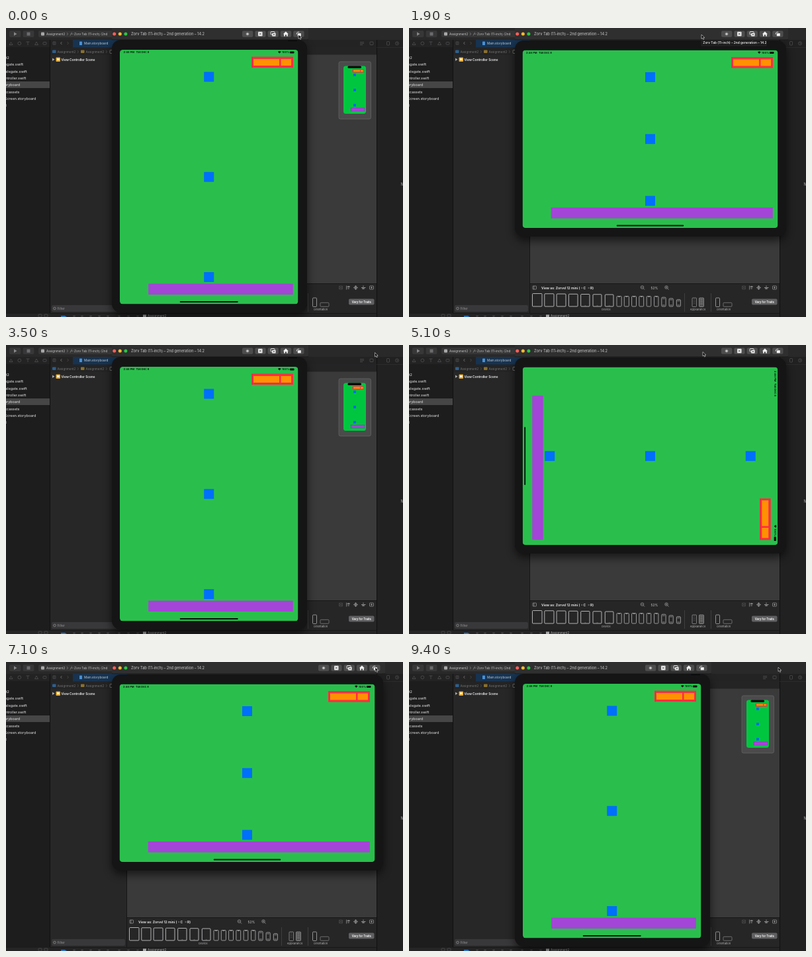
Recreate the animation shown at these times as an HTML page. Size 600 by 438 pixels, loop 9600 ms.

```html
<!DOCTYPE html>
<html lang="en">
<head>
<meta charset="utf-8">
<title>Device rotation</title>
<style>
html, body { margin: 0; width: 100%; height: 100%; overflow: hidden; background: #1d1d1e; }
svg { display: block; width: 100vw; height: 100vh; font-family: Inter, "Open Sans", sans-serif; }
text { white-space: pre; }
</style>
</head>
<body>
<svg id="stage" viewBox="0 0 600 438">
  <filter id="soft" x="-20%" y="-20%" width="140%" height="140%"><feGaussianBlur stdDeviation="7"/></filter>
  <g id="editor"></g>
  <g id="sim"></g>
  <g id="pointer"></g>
</svg>
<script>
const LOOP = 9600, STEP = 100;
const DEVICE = 'Zorv Tab (11-inch) – 2nd generation – 14.2';
const PREVIEW = 'Zorvel 12 mini';
const C = {
  green: '#2abf4c', blue: '#006ffb', purple: '#a345d6', red: '#fb2d42', orange: '#ff9102',
  icon: '#8b8b8c', dim: '#555556', text: '#e6e6e7'
};
const $ = id => document.getElementById(id);

const rect = (x, y, w, h, fill, extra = '') =>
  `<rect x="${x}" y="${y}" width="${w}" height="${h}" fill="${fill}" ${extra}/>`;
const frame = (x, y, w, h, stroke, r = 0.8, sw = 0.7) =>
  rect(x, y, w, h, 'none', `rx="${r}" stroke="${stroke}" stroke-width="${sw}"`);
const line = (d, stroke = C.icon, sw = 0.7) =>
  `<path d="${d}" fill="none" stroke="${stroke}" stroke-width="${sw}"/>`;
const fill = (d, color) => `<path d="${d}" fill="${color}"/>`;
const dot = (x, y, r, color) => `<circle cx="${x}" cy="${y}" r="${r}" fill="${color}"/>`;
const ring = (x, y, r, color) =>
  `<circle cx="${x}" cy="${y}" r="${r}" fill="none" stroke="${color}" stroke-width=".7"/>`;
const text = (x, y, size, str, color = C.text, extra = '') =>
  `<text x="${x}" y="${y}" font-size="${size}" fill="${color}" ${extra}>${str}</text>`;
const BOLD = 'font-weight="600"', MID = 'text-anchor="middle"';

function toolbar() {
  let s = rect(0, 0, 600, 18, '#29292a') + rect(0, 18, 600, 11.5, '#232324');
  s += rect(5, 4, 17.5, 10, '#373738', 'rx="2"') + rect(25.5, 4, 17, 10, '#373738', 'rx="2"');
  s += fill('M12 6.3V11.7L16.5 9Z', '#88888a') + rect(31.5, 6.5, 5, 5, '#6c6c6e');
  s += rect(49, 4, 130, 10, '#363637', 'rx="2"');
  s += rect(53, 6.5, 5, 5, '#a9a9aa', 'rx="1"');
  s += text(61, 11, 4.6, 'Assignment2', '#c6c6c8') + line('M92 7l1.5 2-1.5 2');
  s += line('M97 11.500l2.500-5M98 9h4', C.icon);
  s += text(103, 11, 4.6, 'Zorv Tab (11-inch) (2nd', '#c6c6c8');
  return s;
}

function navigator() {
  let s = rect(0, 29.5, 66, 408.5, '#1d1d1e') + rect(0, 81, 66, 10, '#464647');
  s += line('M5 25.500l2.500-4 2.500 4z', C.dim) + ring(20.3, 23.3, 2.4, C.dim);
  s += line('M30.5 21h5M33 21v5', C.dim);
  s += line('M43.5 25.5L46 21l2.500 4.500Z', C.dim) + frame(56, 21.5, 5, 3.5, C.dim);
  s += text(-28.6, 46.9, 5.4, 'Assignment2');
  ['AppDelegate.swift', 'SceneDelegate.swift', 'ViewController.swift', 'Main.storyboard',
    'Assets.xcassets', 'LaunchScreen.storyboard', 'Info.plist'
  ].forEach((name, i) => s += text(-20.7, 57.3 + i * 10.3, 5.4, name));
  return s;
}

function outline() {
  let s = rect(66, 29.5, 117, 408.5, '#272728') + rect(101, 18, 82, 11.5, '#173350');
  s += line('M66.500 18V438', '#111112', 1) + line('M182.500 29V432', '#161616', 1);
  s += line('M71 21h4v4h-4zM73 21v4', C.dim) + line('M84.500 21l-2 2 2 2') + line('M92.500 21l2 2-2 2', C.dim);
  s += rect(111, 20.5, 4, 5.5, '#4b8fd0', 'rx=".6"') + text(118, 25, 4.7, 'Main.storyboard', '#c3ccd6');
  s += rect(67, 30, 116, 11, '#242425');
  [70, 113].forEach(x => {
    s += rect(x, 33.5, 5.5, 4.5, x < 80 ? '#2f5f8c' : '#8a7130', 'rx=".7"');
    s += text(x + 7.5, 37.6, 4.5, 'Assignment2', '#737374') + line(`M${x + 38} 34l1.500 2-1.500 2`, C.dim);
  });
  s += frame(157, 33.5, 4, 5, C.icon);
  s += fill('M70 45.500V50L73.500 47.750Z', '#a6a6a7');
  s += rect(75.5, 44.5, 6.5, 6.5, '#e5aa2f', 'rx="1"') + rect(77, 46.2, 3.5, 2.5, '#fff');
  s += text(83.5, 49.5, 4.75, 'View Controller Scene', '#f2f2f2', BOLD);
  s += rect(69, 420, 111, 10, '#38383a', 'rx="2"') + ring(73.5, 425, 1.8, '#999');
  return s + text(77.5, 426.8, 4.8, 'Filter', '#98989a');
}

function phonePreview() {
  let s = rect(503, 51, 48.5, 87, '#4b4b4c', 'rx="2.500" stroke="#686869" stroke-width=".7"');
  s += rect(510, 57.5, 34, 72.5, '#00c63f', 'rx="3.500"');
  s += rect(516.5, 57.5, 20.5, 3.5, '#080808', 'rx="1.500"');
  s += rect(523.5, 62.5, 17.5, 5, C.red) + rect(525, 63.7, 10, 2.5, C.orange) + rect(536, 63.7, 4, 2.5, C.orange);
  [71, 94, 117].forEach(y => s += rect(525, y - 2, 4, 4, '#0a6af0'));
  s += rect(521, 121, 21, 5, C.purple, 'stroke="#542477" stroke-width=".4" stroke-dasharray="1 1"');
  return s;
}

function deviceBar() {
  const gray = '#a0a0a1';
  let s = rect(183, 387, 377, 45, '#262627') + line('M183 387.500H560', '#171718', 1);
  s += frame(187, 391, 5.5, 5, gray) + line('M188.800 391v5', gray);
  s += text(200, 395.5, 5, `View as: ${PREVIEW} (`, '#f0f0f0', BOLD);
  s += line('M260 394h2.500M270.500 394h2.500', gray, 0.8);
  s += text(263.5, 395.5, 5, 'C', '#f0f0f0', BOLD) + text(274, 395.5, 5, 'R)', '#f0f0f0', BOLD);
  [352.5, 389].forEach((x, i) => {
    s += ring(x, 393, 2.3, gray);
    s += line(`M${x + 1.6} 394.600l2 2M${x - 1.2} 393h2.400` + (i ? `M${x} 391.800v2.400` : ''), gray);
  });
  s += text(371, 395.5, 5, '52%', '#d0d0d0', MID);
  s += line('M503.500 391.500l5 4M508.500 391.500l-5 4', '#555') + frame(503.5, 391, 5, 5, '#505052');
  s += line('M514.500 390.500v6M516 392h4M516 395h3', gray) + frame(516, 391.5, 3, 1.5, gray);
  s += line('M528.500 390v7M525 393.500h7M527 391.500h3v4h-3z', gray);
  s += line('M537 393.500h6.500M540 390.500v2M540 396v-1.500M538 395h4', gray, 0.9);
  s += frame(549.5, 391, 6, 5, gray) + line('M552.500 392v3M551 393.500h3', gray);
  for (let i = 0; i < 7; i++) {
    const w = 14.5 - i * 0.3, h = 19.5 - i * 0.25, x = 186.5 + i * 18.3;
    s += frame(x, 422 - h, w, h, '#c2c2c3', 1, 0.9);
    if (i > 3) s += line(`M${x + w / 2 - 1} 420.800h2`, '#b5b5b6', 0.4);
  }
  for (let i = 0; i < 9; i++) {
    const h = 15.5 - Math.max(0, i - 5) * 1.7, x = 314 + i * 11.3;
    s += frame(x, 422 - h, 7.2 - i * 0.15, h, '#b5b5b6', 1.3, 0.8);
    s += line(i < 6 ? `M${x + 2} ${423 - h}h3` : `M${x + 1} ${424 - h}h4M${x + 1} 420h4`, '#aaaaab');
  }
  s += text(298, 428.3, 4.1, 'Device', '#b7b7b8', MID);
  s += line('M416.500 402V430M456.500 402V430', '#4a4a4b');
  s += frame(428, 409, 6.5, 13.5, gray, 1) + line('M430 411h2.500M429.500 414h3.500M429.500 417h3.500', C.dim);
  s += rect(438.5, 409, 7, 13.5, '#555', `rx="1" stroke="${gray}" stroke-width=".7"`) + line('M440 412h4M440 415h4M440 418h4');
  s += text(436.5, 428.3, 4.1, 'Appearance', '#b7b7b8', MID);
  s += frame(463.5, 409, 6, 13.5, '#c0c0c1', 1.2) + frame(475, 416.3, 13, 6, C.icon, 1.2);
  s += text(475.5, 428.3, 4.1, 'Orientation', '#b7b7b8', MID);
  s += rect(518, 410.5, 38.5, 9, '#606062', 'rx="1.800"');
  s += text(537.3, 416.6, 4.25, 'Vary for Traits', '#fff', `${BOLD} ${MID}`);
  return s;
}

function rightSide() {
  let s = rect(560, 18, 40, 420, '#212122') + line('M560.500 18V438', '#111', 1);
  s += line('M560 29.500H600', '#343435', 0.5);
  s += line('M535 21.500h6M535 23.500h6M535 25.500h4', C.dim) + frame(550, 21, 5, 4.5, C.dim);
  s += frame(575.5, 20.5, 4, 5.5, C.dim);
  s += ring(591, 23.3, 2.5, C.dim) + line('M591 21.800v1.700h1.200', C.dim);
  return s + text(596.5, 239, 5.5, 'N', '#a5a5a6');
}

function footer() {
  let s = rect(66, 432, 494, 6, '#242425') + line('M66 432.500H560', '#141415');
  s += fill('M83 436h6l3 2h-9z', '#2b6cb8');
  [101, 113, 126, 139, 152, 169, 183, 197].forEach(x => s += line(`M${x} 436.500h4M${x + 2} 435.500v2.500`, C.dim));
  s += rect(207, 434.5, 5, 3.5, '#a9a9aa') + text(214, 438.2, 4.6, 'Assignment2', '#a9a9aa');
  return s + rect(0, 433, 66, 5, '#252526') + frame(49, 434, 5, 4, C.dim) + frame(58, 434, 5, 4, C.dim);
}

$('editor').innerHTML = rect(0, 0, 600, 438, '#1d1d1e') + rect(183, 29.5, 377, 358, '#3a3a3b') +
  rect(183, 29.5, 377, 11, '#242425') + toolbar() + navigator() + outline() + phonePreview() +
  deviceBar() + rightSide() + footer();

// Cubic-bezier(.42, 0, .58, 1)
function ease(u) {
  if (u <= 0) return 0;
  if (u >= 1) return 1;
  let lo = 0, hi = 1, s;
  for (let i = 0; i < 24; i++) {
    s = (lo + hi) / 2;
    const x = 3 * (1 - s) ** 2 * s * 0.42 + 3 * (1 - s) * s * s * 0.58 + s ** 3;
    if (x < u) lo = s; else hi = s;
  }
  return s * s * (3 - 2 * s);
}
const mix = (a, b, p) => a + (b - a) * p;

// When the window swaps shape, and when its screen starts to turn.
const TURNS = [
  { at: 500, spin: 598, land: 1 }, { at: 3000, spin: 3070, land: 0 },
  { at: 5000, spin: 5098, land: 1 }, { at: 7400, spin: 7470, land: 0 }
];
const SPIN = 420;
const SHAPES = [
  { x: 172, y: 33, w: 269.5, h: 385.5, bar: 297, bezel: [160, 18, 295, 413], pill: 88 },
  { x: 171.5, y: 33.5, w: 386, h: 269.5, bar: 413, bezel: [160, 19, 410, 297], pill: 101.5 }
];

function buttons(x) {
  let s = '';
  for (let i = 0; i < 5; i++) s += rect(x - 8 + i * 19.3, 4.2, 16.3, 9.6, '#4d4d4e', 'rx="2"');
  const w = '#f0f0f0', at = i => x + i * 19.3;
  s += dot(at(0), 9, 1.6, w) + line(`M${at(0) - 3} 9h6M${at(0)} 6v6M${at(0) - 2} 7l4 4M${at(0) + 2} 7l-4 4`, '#b8b8b9', 0.4);
  s += rect(at(1) - 3.2, 5.8, 6.4, 6.4, w, 'rx=".7"') + line(`M${at(1) - 1.5} 7.500l3 3M${at(1) + 1.5} 7.500l-3 3`, '#444', 0.8);
  s += frame(at(2) - 3.5, 5.5, 6, 4.5, w, 0.8, 0.9) + rect(at(2) - 1.3, 7.7, 5.2, 4.8, w, 'rx=".6"') + dot(at(2) + 1.3, 10.1, 1, '#4d4d4e');
  s += fill(`M${at(3) - 4} 9.200l4-4 4 4h-1.100v3.300h-1.800v-2.300h-2.200v2.300h-1.800v-3.300z`, w);
  s += rect(at(4) - 1.4, 8, 5, 4.3, w, 'rx=".5"') + line(`M${at(4) - 3} 9.500c0-3 1.500-3.500 4-3.200`, w, 0.9);
  return s;
}

// Screen contents laid out around their centre.
function app(w, h, pill) {
  const l = -w / 2, t = -h / 2, r = w / 2, b = h / 2, ink = '#03130a';
  const status = (x, str) => text(x, t + 5.4, 4.1, str, ink, BOLD);
  let s = rect(l, t, w, h, C.green);
  s += status(l + 5.5, '2:46 PM') + status(l + 24.5, 'Tue Dec 8') + status(r - 24.5, '100%');
  s += fill(`M${r - 30.5} ${t + 3}q2.300-2 4.600 0l-2.300 2.500z`, ink);
  s += rect(r - 12.5, t + 2.4, 6.5, 3.2, ink, 'rx=".8"');
  s += rect(r - 70.5, t + 10.5, 63, 16.7, C.red);
  s += rect(r - 67.5, t + 14, 39, 10, C.orange) + rect(r - 26, t + 14, 15.5, 10, C.orange);
  [t + 41, 0, b - 41].forEach(y => s += rect(-7.5, y - 7.5, 15, 15, C.blue));
  s += rect(l + 43.2, b - 31, w - 50.9, 16.5, C.purple);
  if (pill) s += rect(-pill / 2, b - 4.4, pill, 1.9, ink, 'rx=".9"');
  return s;
}

function simulator(t) {
  const turn = TURNS.filter(k => t >= k.at).pop();
  const land = turn ? turn.land : 0;
  const p = turn ? ease((t - turn.spin) / SPIN) : 1;
  const now = SHAPES[land], old = SHAPES[1 - land];
  const [bx, by, bw, bh] = now.bezel;
  const pill = p === 1 ? now.pill : p < 0.01 ? old.pill : 0;
  let s = rect(bx, by + 6, bw, bh, '#000', 'rx="14" opacity=".6" filter="url(#soft)"');
  s += rect(bx, by, bw, bh, '#151516', 'rx="13"');
  if (!land) s += rect(426, 18.5, 14, 1.5, '#08090a', 'rx=".7"');
  s += rect(160, -4, now.bar, 22, '#2f2f30', 'rx="3"') + line(`M160 17.800H${160 + now.bar}`, '#111', 0.6);
  ['#ff5f57', '#febc2e', '#28c840'].forEach((c, i) => s += dot(163.7 + i * 8.6, 9, 2.5, c));
  s += text(189, 11.1, 5.6, DEVICE, '#b8b8b9', 'font-weight="500"') + buttons(land ? 480 : 365);
  s += `<clipPath id="glass">${rect(now.x, now.y, now.w, now.h, '#000', 'rx="4.500"')}</clipPath>`;
  s += `<g clip-path="url(#glass)">` + rect(now.x, now.y, now.w, now.h, '#000');
  s += `<g transform="translate(${now.x + now.w / 2} ${now.y + now.h / 2}) rotate(${90 * (1 - p)})">`;
  s += app(mix(old.w, now.w, p), mix(old.h, now.h, p), pill) + '</g></g>';
  if (t >= 1600 && t < 2200) {
    s += rect(442, 18, 98, 9, '#1c1c1d', 'stroke="#39393b" stroke-width=".4"');
    s += text(444.3, 24.2, 4.85, DEVICE, '#fff', 'font-weight="500"');
  }
  return s;
}

// Pointer legs: start, end, from, to
const LEGS = [
  [2200, 2700, [442, 10], [557.5, 11.5]],
  [3600, 4350, [557.5, 11.5], [444, 10.5]],
  [6100, 6800, [444, 10.5], [558, 8]]
];

function pointer(t) {
  let [x, y] = LEGS[0][2];
  for (const [a, b, from, to] of LEGS) {
    if (t < a) break;
    const p = ease((t - a) / (b - a));
    x = mix(from[0], to[0], p);
    y = mix(from[1], to[1], p);
  }
  return `<path transform="translate(${x} ${y})" d="M0 0V6.300L1.500 5 2.600 7.400 3.800 6.900 2.800 4.500H4.700Z" fill="#050505" stroke="#e8e8e8" stroke-width=".6"/>`;
}

const start = performance.now();
let shown = -1;
function tick() {
  const t = Math.floor((performance.now() - start) % LOOP / STEP) * STEP;
  if (t !== shown) {
    shown = t;
    $('sim').innerHTML = simulator(t);
    $('pointer').innerHTML = pointer(t);
  }
  requestAnimationFrame(tick);
}
tick();
</script>
</body>
</html>
```
